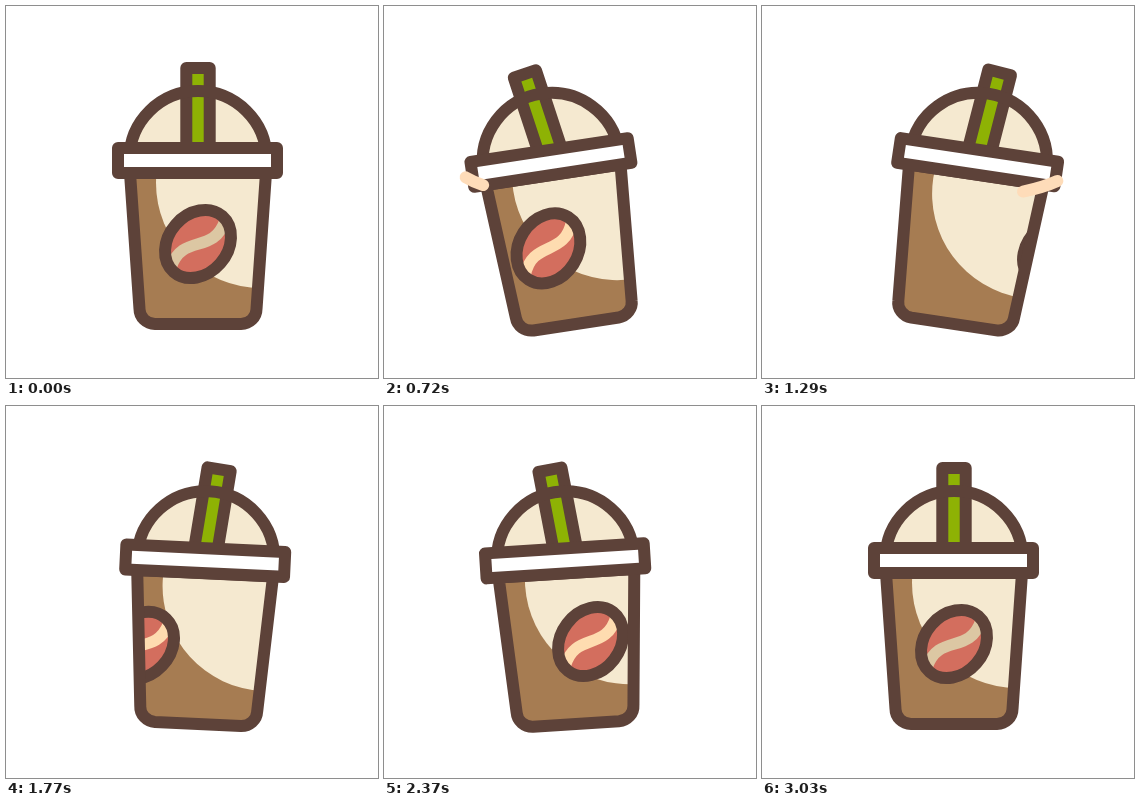
An HTML page that plays this animation: 372x372 px, repeating every 3930 ms.

```html
<!DOCTYPE html>
<html>
<head>
<meta charset="utf-8">
<title>Iced coffee</title>
<style>
  html, body { margin: 0; width: 100%; height: 100%; overflow: hidden; background: #fff; }
  svg { display: block; width: 100vw; height: 100vh; }
  .line { fill: none; stroke: #5d4239; stroke-width: 12; stroke-linejoin: round; }
</style>
</head>
<body>
<svg viewBox="0 0 372 372">
  <defs>
    <path id="body" d="M124 167L133.5 303A16 15 0 0 0 149 318H235A16 15 0 0 0 250.5 303L260 167Z"/>
    <path id="dome" d="M123.5 153A68.5 68 0 0 1 260.5 153Z"/>
    <clipPath id="inside"><use href="#body"/></clipPath>
  </defs>
  <g id="cup">
    <g clip-path="url(#inside)">
      <use href="#body" fill="#a67c52"/>
      <circle cx="255" cy="177" r="105" fill="#f5e9d0"/>
      <g id="bean">
        <ellipse rx="37" ry="29.6" transform="rotate(-49)" fill="#d36e5e"/>
        <path id="stripe" d="M-27 23C-15 -11 15 11 27 -23" fill="none" stroke-width="11.5"/>
        <ellipse class="line" rx="37" ry="29.6" transform="rotate(-49)"/>
      </g>
    </g>
    <use href="#body" class="line"/>
    <use href="#dome" fill="#f5e9d0"/>
    <g id="straw">
      <rect x="180.3" y="62" width="23.4" height="90" class="line" style="fill:#8eb204"/>
    </g>
    <use href="#dome" class="line"/>
    <rect x="112" y="142" width="159" height="25" class="line" style="fill:#fff"/>
  </g>
  <path id="swoosh" fill="none" stroke="#fedcb9" stroke-width="12" stroke-linecap="round"/>
</svg>
<script>
const LOOP = 3930, STEP = 30, REST = 3030, STRAW_LAG = 100;
const $ = id => document.getElementById(id);

// Eases in and out between [time, value] poses.
function ease(poses, t) {
  const next = poses.findIndex(p => p[0] > t);
  if (next < 0) return poses[poses.length - 1][1];
  if (next === 0) return poses[0][1];
  const [t0, v0] = poses[next - 1], [t1, v1] = poses[next];
  const u = (t - t0) / (t1 - t0);
  return v0 + (v1 - v0) * u * u * (3 - 2 * u);
}

const tilt = t => ease([[0, 0], [610, -9.6], [1430, 10], [1500, 10], [2150, -9.5], [2530, 0]], t);

// The bean leaves on the right and comes back in on the left.
const spin = t => ease([[0, 0], [450, -20], [630, -20], [1460, 105],
  [1460, -105], [2250, 24], [2700, 0]], t);

// Angle along the swoosh's orbit, moving at a steady rate.
const sweep = (t, start, rate) => Math.min(180, 24 + rate * Math.max(0, t - start));

function orbit(deg) {
  const a = deg * Math.PI / 180;
  return `${192 - 125 * Math.cos(a)} ${153 + 39 * Math.sin(a)}`;
}

function draw(t) {
  const dx = spin(t);
  $('cup').setAttribute('transform', `rotate(${tilt(t)} 192 318)`);
  $('straw').setAttribute('transform', `rotate(${tilt(t - STRAW_LAG)} 192 140)`);
  $('bean').setAttribute('transform', `translate(${192 + dx} ${238 - 0.07 * dx})`);
  $('stripe').setAttribute('stroke', t < STEP || t >= REST ? '#dcc7a3' : '#fedcb0');
  const head = sweep(t, 621, 0.182), tail = sweep(t, 696, 0.1675);
  $('swoosh').setAttribute('d', head - tail > 5 ? `M${orbit(tail)}A125 39 0 0 0 ${orbit(head)}` : '');
}

const start = performance.now();
function tick() {
  const t = (performance.now() - start) % LOOP;
  draw(Math.floor(t / STEP) * STEP);
  requestAnimationFrame(tick);
}
tick();
</script>
</body>
</html>
```
